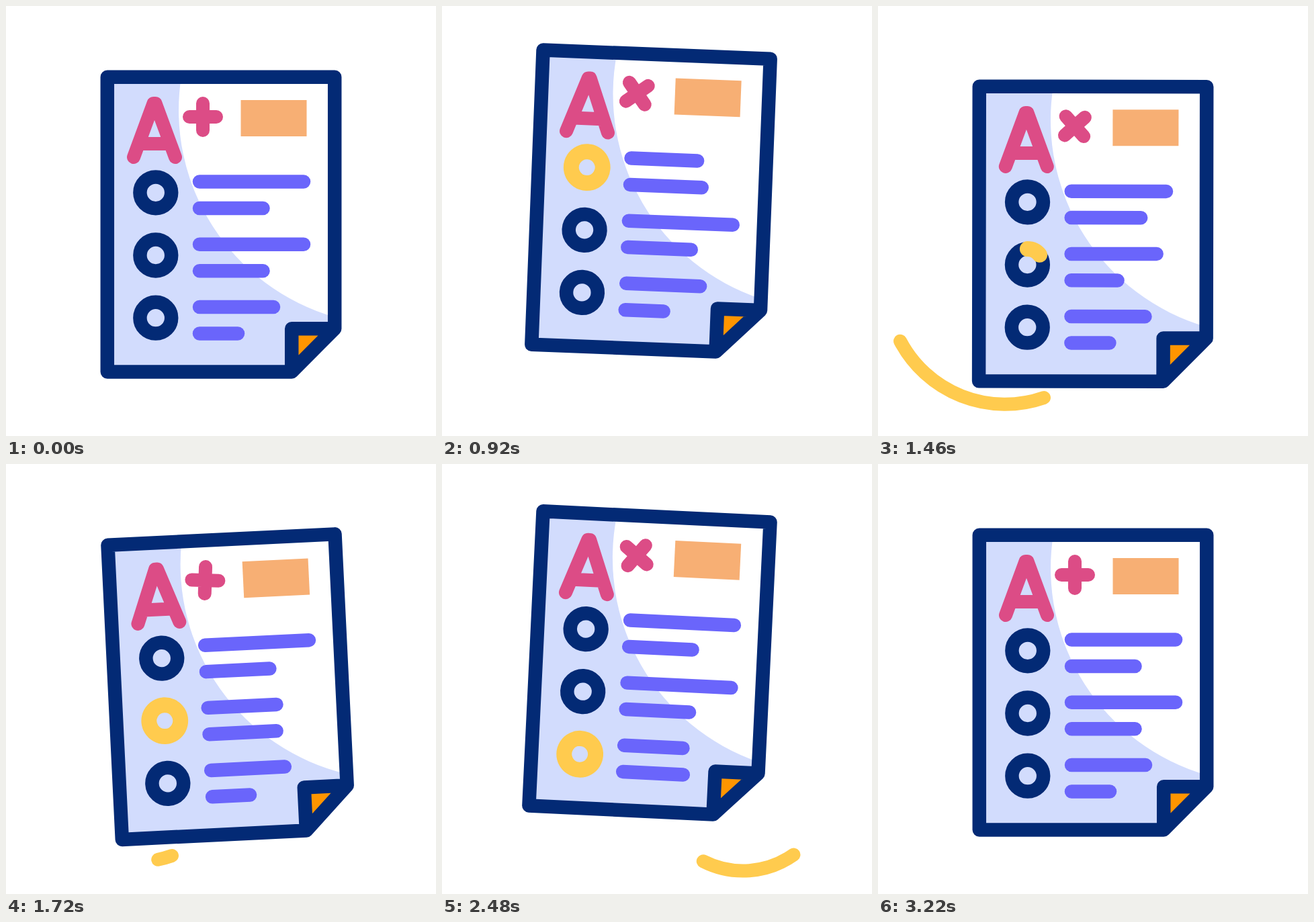
These frames come from a looping animation (640 px wide and 640 px high, 3560 ms). An HTML page:

```html
<!DOCTYPE html>
<html lang="en">
<head>
<meta charset="utf-8">
<title>Graded paper</title>
<style>
  html, body { margin: 0; width: 100%; height: 100%; overflow: hidden; background: #fff; }
  svg { display: block; width: 100vw; height: 100vh; }
  path, circle { stroke-linecap: round; stroke-linejoin: round; }
  .navy { fill: none; stroke: #032a75; stroke-width: 20.5; }
  .pink { fill: none; stroke: #dc4c86; stroke-width: 20; }
  .bar { fill: none; stroke: #6a65fb; stroke-width: 20.5; }
  .swoosh { fill: none; stroke: #ffcb4e; stroke-width: 20; }
  .mark { fill: none; stroke: #ffcb4e; stroke-width: 23; }
</style>
</head>
<body>
<svg id="stage" viewBox="0 0 640 640">
  <g id="swooshes"></g>
  <g id="paper">
    <path fill="#fff" d="M151 106H489V480L425 544H151Z"/>
    <path fill="#d2dcfd" d="M151 106H260.8A320.5 320.5 0 0 0 489 463V480H425V544H151Z"/>
    <path fill="#ff9500" d="M425 480H489L425 544Z"/>
    <path class="navy" d="M150.8 105.8H489.2V480.2L425.2 544.4H150.8ZM425.2 544V480.2H489"/>
    <rect x="349.5" y="140" width="98" height="54" fill="#f7af74"/>
    <path class="pink" d="M190 225L219.5 145H222.5L252 225M200 205H242"/>
    <path id="plus" class="pink" d="M273 165H313M293 145V185"/>
    <g id="rows"></g>
  </g>
</svg>
<script>
const LOOP = 3560;
const $ = id => document.getElementById(id);

function add(parent, tag, attrs) {
  const node = document.createElementNS('http://www.w3.org/2000/svg', tag);
  for (const name in attrs) node.setAttribute(name, attrs[name]);
  return parent.appendChild(node);
}

function ease(t, from, to) {
  const x = Math.min(1, Math.max(0, (t - from) / (to - from)));
  return x * x * (3 - 2 * x);
}

// Eased value along [time, value] keys.
function track(t, keys) {
  let value = keys[0][1];
  for (let i = 1; i < keys.length; i++) {
    value += (keys[i][1] - keys[i - 1][1]) * ease(t, keys[i - 1][0], keys[i][0]);
  }
  return value;
}

function arcPath(cx, cy, r, a, b) {
  const point = deg => {
    const rad = deg * Math.PI / 180;
    return `${(cx + r * Math.cos(rad)).toFixed(2)} ${(cy + r * Math.sin(rad)).toFixed(2)}`;
  };
  const large = Math.abs(b - a) > 180 ? 1 : 0;
  return `M${point(a)}A${r} ${r} 0 ${large} ${b > a ? 1 : 0} ${point(b)}`;
}

// A stroke that draws itself along an arc, then erases from its start.
function drawTrim(node, t, s) {
  const head = ease(t, s.start, s.start + s.span);
  const tail = ease(t, s.erase, s.erase + s.span);
  const visible = head - tail > 0.001;
  node.setAttribute('visibility', visible ? 'visible' : 'hidden');
  if (!visible) return;
  const sweep = s.to - s.from;
  node.setAttribute('d', arcPath(s.cx, s.cy, s.r, s.from + sweep * tail, s.from + sweep * head));
}

const LIFT = [[230, 0], [810, -37], [1530, 15.5], [2270, -37], [2900, 0]];
const TILT = [[470, 0], [1140, 3], [1795, -3], [2575, 3], [3200, 0]];

const longBar = s => [[s, 0], [s + 910, -63], [s + 1420, 0]];
const shortBar = s => [[s, 0], [s + 300, -30], [s + 970, 31.5], [s + 1420, 0]];

const rows = [
  { y: 277.8, mark: 580, lengths: [155, 94.5], keys: [longBar(195), shortBar(200)] },
  { y: 371, mark: 1390, lengths: [155, 94.5], keys: [longBar(1040), shortBar(1050)] },
  { y: 464.2, mark: 2160, lengths: [110, 57], keys: [
    [[1690, 0], [2300, -27], [3000, 0]],
    [[1690, 0], [1980, -30], [2500, 33], [3200, 0]]
  ] }
];

const trims = [
  { cx: 189, cy: 416.5, r: 176.3, from: 159.6, to: 70.8, start: 975, erase: 1390, span: 400 },
  { cx: 448, cy: 475, r: 130.5, from: -10.5, to: 117, start: 1880, erase: 2278, span: 400 }
].map(spec => ({ spec, node: add($('swooshes'), 'path', { class: 'swoosh' }) }));

const bars = [];
for (const row of rows) {
  add($('rows'), 'circle', { class: 'navy', cx: 222.8, cy: row.y, r: 23.4 });
  trims.push({
    spec: { cx: 222.8, cy: row.y, r: 23.4, from: -90, to: 269.9, start: row.mark, erase: row.mark + 340, span: 300 },
    node: add($('rows'), 'path', { class: 'mark' })
  });
  row.lengths.forEach((length, i) => bars.push({
    y: row.y - 16.2 + 39.4 * i, length, keys: row.keys[i],
    node: add($('rows'), 'path', { class: 'bar' })
  }));
}

function render(t) {
  $('paper').setAttribute('transform', `translate(0 ${track(t, LIFT)}) rotate(${track(t, TILT)} 320 96)`);
  $('plus').setAttribute('transform', `rotate(${360 * ease(t, 195, 3195)} 293 165)`);
  for (const bar of bars) {
    bar.node.setAttribute('d', `M288 ${bar.y}h${bar.length + track(t, bar.keys)}`);
  }
  for (const { node, spec } of trims) drawTrim(node, t, spec);
}

const began = performance.now();
function tick() {
  render((performance.now() - began) % LOOP);
  requestAnimationFrame(tick);
}
render(0);
requestAnimationFrame(tick);
</script>
</body>
</html>
```
